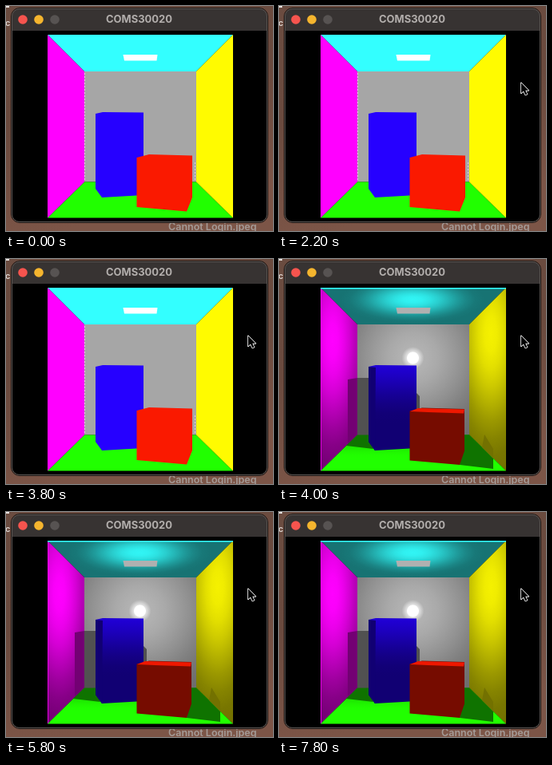
Animation of 334 by 282 pixels, one loop 8 s. Source, as an HTML page with a canvas:

```html
<!DOCTYPE html>
<html lang="en">
<head>
<meta charset="utf-8">
<title>Box render</title>
<style>
  html, body { margin: 0; width: 334px; height: 282px; overflow: hidden; background: #6b4c40; }
  canvas { display: block; }
</style>
</head>
<body>
<canvas id="stage" width="334" height="282"></canvas>
<script>
const g = document.getElementById('stage').getContext('2d');
const LOOP = 8000, LIT_AT = 4000, AMBIENT = 0.45;

const COLOR = {
  cyan: [51, 255, 255], magenta: [255, 0, 255], yellow: [255, 251, 0], green: [33, 255, 0],
  gray: [166, 166, 166], blue: [38, 0, 255], red: [250, 25, 0]
};

// Room corners: front and back rectangles, clockwise from top left
const rect = (l, t, r, b) => [[l, t], [r, t], [r, b], [l, b]];
const front = rect(52, 36, 284, 265.5), back = rect(98, 82, 238, 220.5);
const side = i => [front[i], front[(i + 1) % 4], back[(i + 1) % 4], back[i]];
const [CEILING, RIGHT, FLOOR, LEFT] = [0, 1, 2, 3].map(side);

const TALL = [[112, 135], [121, 133], [172, 133.5], [172, 237], [120, 240], [112, 229]];
const SHORT = [[163.5, 190], [179, 186], [233, 187.5], [233, 240], [226, 257.5], [163.5, 252]];

const shade = (name, k = 1) =>
  `rgb(${COLOR[name].map(v => Math.min(255, Math.round(v * k))).join(',')})`;

// Colour stops that ease from brightness hi to lo
function fade(grad, name, hi, lo) {
  for (let i = 0; i <= 8; i++) {
    const k = 0.5 + 0.5 * Math.cos(Math.PI * i / 8);
    grad.addColorStop(i / 8, shade(name, lo + (hi - lo) * k));
  }
  return grad;
}

const fall = (y0, y1, name, hi, lo) =>
  fade(g.createLinearGradient(0, y0, 0, y1), name, hi, lo);

function trace(pts) {
  g.beginPath();
  pts.forEach(p => g.lineTo(...p));
  g.closePath();
}

function poly(pts, fill) {
  trace(pts);
  g.fillStyle = fill;
  g.fill();
}

function dot(x, y, r, fill) {
  g.beginPath();
  g.arc(x, y, r, 0, Math.PI * 2);
  g.fillStyle = fill;
  g.fill();
}

function text(str, x, y, font, fill, align = 'left') {
  g.font = font + ' Inter, sans-serif';
  g.textAlign = align;
  g.fillStyle = fill;
  g.fillText(str, x, y);
}

// Wall lit by an elliptical pool of light
function wall(pts, name, x, y, rx, ry, hi, lo) {
  g.save();
  trace(pts);
  g.clip();
  g.translate(x, y);
  g.scale(1, ry / rx);
  g.fillStyle = fade(g.createRadialGradient(0, 0, 0, 0, 0, rx), name, hi, lo);
  g.fillRect(-400, -1500, 800, 3000);
  g.restore();
}

function lampPanel(fill) {
  poly([[146.5, 61], [189.5, 61], [188.5, 68.5], [148, 68.5]], fill);
}

function flatScene() {
  poly(back, shade('gray'));
  poly(CEILING, shade('cyan'));
  poly(FLOOR, shade('green'));
  poly(LEFT, shade('magenta'));
  poly(RIGHT, shade('yellow'));
  lampPanel('#fff');
  // ragged seams between walls
  g.fillStyle = '#e4cce0';
  for (let y = 84; y < 220; y += 4) {
    g.fillRect(98, y, 1, 2);
    if (y > 192) g.fillRect(236, y, 1, 2);
  }
  poly(TALL, shade('blue'));
  poly(SHORT, shade('red'));
}

function glowBall(x, y) {
  const grad = g.createRadialGradient(x, y, 6, x, y, 14);
  grad.addColorStop(0, 'rgba(255,255,255,.8)');
  grad.addColorStop(1, 'rgba(255,255,255,0)');
  dot(x, y, 14, grad);
  dot(x, y, 7.5, '#fff');
}

function shadows() {
  poly([[86, 151], [98, 149], [98, 220], [86, 232]], shade('magenta', AMBIENT));
  poly([[98, 149], [113, 149], [113, 221], [98, 221]], shade('gray', AMBIENT + 0.04));
  poly([[171, 167], [176, 172], [176, 190], [171, 190]], shade('gray', AMBIENT + 0.04));
  poly([[98, 220.5], [113, 220.5], [118, 238], [84, 234]], shade('green', AMBIENT));
  poly([[230, 220.5], [238, 220.5], [268, 250], [268, 263], [226, 258]], shade('green', AMBIENT));
  poly([[254, 236], [257, 220], [268, 238], [268, 250]], shade('yellow', AMBIENT));
}

function litScene() {
  wall(back, 'gray', 168, 124, 125, 125, 1.08, 0.65);
  wall(CEILING, 'cyan', 167, 51, 90, 30, 0.96, AMBIENT);
  wall(LEFT, 'magenta', 67, 102, 56, 175, 1, AMBIENT);
  wall(RIGHT, 'yellow', 265, 94, 62, 175, 0.96, AMBIENT);
  poly(FLOOR, fall(215, 250, 'green', 0.75, 1));
  g.fillStyle = shade('cyan');
  g.fillRect(52, 36, 232, 1.5);
  g.fillStyle = shade('magenta', 0.9);
  g.fillRect(52, 38, 1, 227);
  lampPanel('#b0b0b0');
  shadows();
  glowBall(167.5, 124);

  poly(TALL, fall(112, 205, 'blue', 0.9, AMBIENT));
  const [a, b, , , e, f] = TALL;
  poly([a, [b[0], 136], e, f], shade('blue', AMBIENT));

  poly(SHORT.map(([x, y]) => [Math.min(x, 232), y + 0.5]), shade('red', AMBIENT + 0.02));
  poly([[164, 191], [174, 187], [232, 188.5], [231, 193.5], [186, 192]], shade('red', 0.95));
}

function desktop() {
  const wood = g.createLinearGradient(0, 0, 60, 282);
  ['#6b4c40', '#6a4a3e', '#7c5547'].forEach((c, i) => wood.addColorStop(i / 2, c));
  g.fillStyle = wood;
  g.fillRect(0, 0, 334, 282);
  g.fillStyle = '#e8e2df';
  g.fillRect(0, 0, 4, 2);
  text('c', -1, 25, '600 11px', '#ddd5d1');
  text('Cannot Login.jpeg', 203, 280.5, '600 12.5px', '#a59b97');
}

function frame(inset, color) {
  g.beginPath();
  g.roundRect(7 + inset, 3 + inset, 320 - 2 * inset, 268 - 2 * inset, 10 - inset);
  g.strokeStyle = color;
  g.lineWidth = 1;
  g.stroke();
}

function appWindow(scene) {
  g.save();
  g.beginPath();
  g.roundRect(7, 3, 320, 268, 10);
  g.clip();
  g.fillStyle = '#000';
  g.fillRect(7, 3, 320, 268);
  g.fillStyle = '#373332';
  g.fillRect(7, 3, 320, 28);
  scene();
  g.restore();
  frame(-0.5, '#1c1512');
  frame(0.5, '#5a5654');
  ['#f6544e', '#f5b52e', '#575352'].forEach((c, i) => dot(21 + 20 * i, 17, 5.8, c));
  text('COMS30020', 166.5, 21.2, 'bold 13px', '#b2aeac', 'center');
}

function pointer(x, y) {
  g.save();
  g.translate(x, y);
  g.scale(0.86, 0.86);
  trace([[1, 1], [1, 16], [4.5, 12.8], [7.3, 18.5], [9.8, 17.5], [7.2, 12], [11.8, 12]]);
  g.lineJoin = 'round';
  g.lineWidth = 2;
  g.strokeStyle = '#f2f2f2';
  g.stroke();
  g.fillStyle = '#000';
  g.fill();
  g.restore();
}

function draw(t) {
  desktop();
  appWindow(t < LIT_AT ? flatScene : litScene);
  const p = Math.min(1, Math.floor(t / 200) / 4);
  if (p > 0) pointer(302 + 36 * (1 - p) ** 2, 95.5);
}

function tick() {
  draw(performance.now() % LOOP);
  requestAnimationFrame(tick);
}
tick();
</script>
</body>
</html>
```
